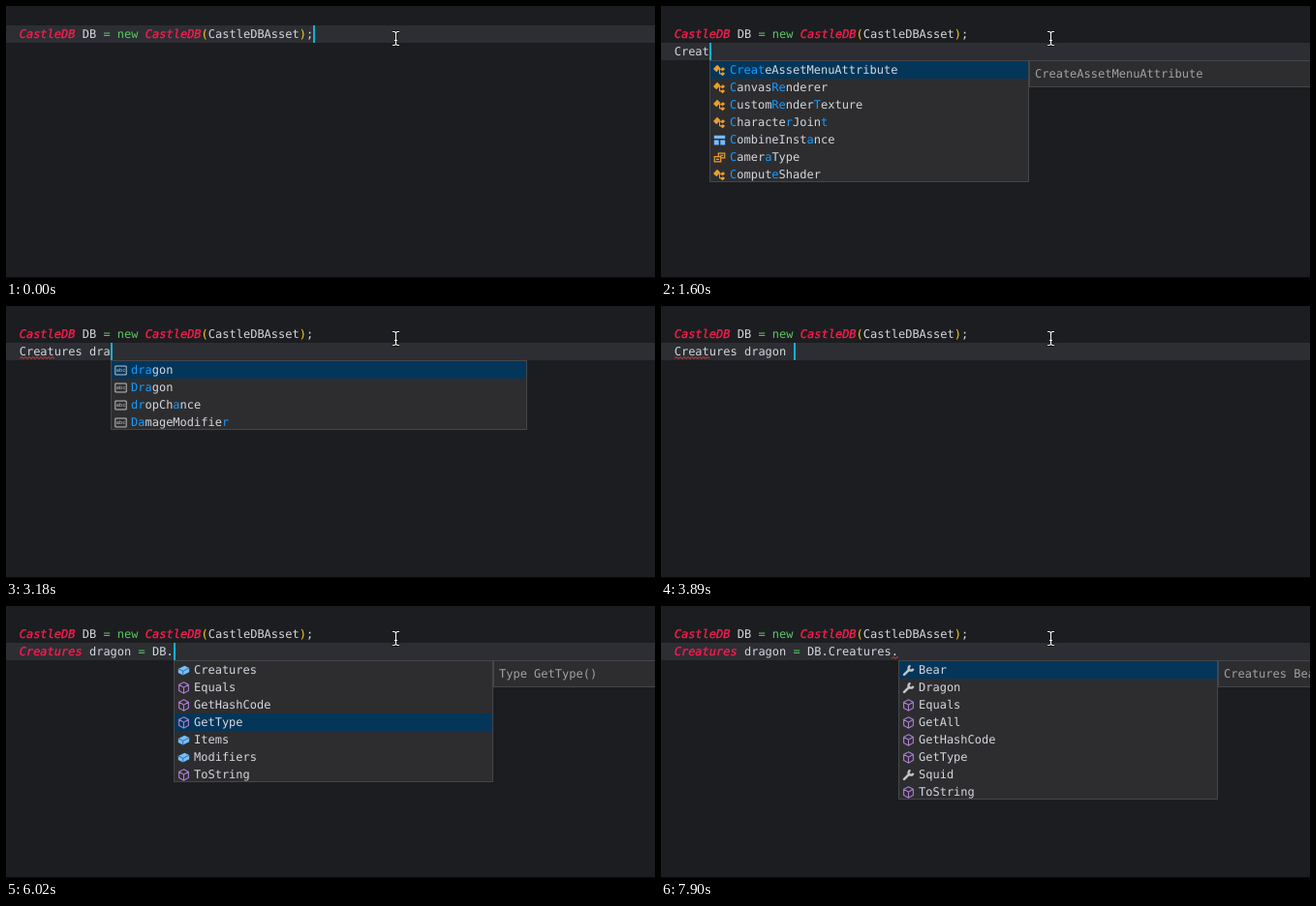
Animation, 670 px wide and 281 px high, one loop 7.99 s. Source, as an HTML page:

```html
<!DOCTYPE html>
<html lang="en">
<head>
<meta charset="utf-8">
<title>Code completion</title>
<style>
html, body { margin: 0; width: 100%; height: 100%; overflow: hidden; background: #1c1d20; }
#stage { position: relative; width: 670px; height: 281px; overflow: hidden; color: #d3d6dc;
  font: 12px/18px "DejaVu Sans Mono", monospace; text-rendering: geometricPrecision; white-space: pre; }
#stage > * { position: absolute; }
.line { left: 13.7px; height: 18px; }
#line1 { top: 20px; }
#line2 { top: 38px; }
.line i { color: #ff1c4f; -webkit-text-stroke: .3px #ff1c4f; }
.line u { color: #5bc862; text-decoration: none; }
.line s { color: #f9cf1c; text-decoration: none; }
#active { left: 0; width: 670px; height: 18px; background: #2c2e33; }
#caret { width: 2px; height: 18px; background: #14b0d0; }
#wave { top: 52px; height: 4px; overflow: hidden; }
#wave path { fill: none; stroke: #e8423f; }
#list, #info { top: 56px; box-sizing: border-box; border: 1px solid #454649; background: #2d2d30; overflow: hidden; }
.row { position: relative; height: 18px; padding-left: 20px; }
.row.on { background: #04365a; }
.row b { font-weight: 400; color: #149cff; }
.row svg { position: absolute; left: 3px; top: 2.5px; width: 13px; height: 13px; }
#bar { position: absolute; right: 0; top: 0; width: 10px; height: 27px; background: #79797966; }
#info { width: 430px; padding: 4px 5px; color: #a0a1a3; }
#info p { margin: 26px 0 0; color: #d0d1d3; font: 12px/18px Inter, sans-serif; }
#mouse { left: 396px; top: 24px; }
#edge { left: 0; top: 280px; width: 670px; height: 1px; background: #0b0b0c; }
</style>
</head>
<body>
<div id="stage">
  <div id="active"></div>
  <div id="line1" class="line"><i>CastleDB</i> DB <u>=</u> <u>new</u> <i>CastleDB</i><s>(</s>CastleDBAsset<s>)</s>;</div>
  <div id="line2" class="line"></div>
  <svg id="wave"><path/></svg>
  <div id="caret"></div>
  <div id="list"></div>
  <div id="info"></div>
  <svg id="mouse" width="13" height="18" fill="none">
    <path id="beam" d="M3 2.5h2l1.5 1 1.5-1h2M6.500 3.500v12M5 11.500h3M3 16.500h2l1.500-1 1.500 1h2" stroke="#111" stroke-width="3"/>
    <path d="M3 2.5h2l1.5 1 1.5-1h2M6.500 3.500v12M5 11.500h3M3 16.500h2l1.500-1 1.500 1h2" stroke="#f4f4f4" stroke-width="1.2"/>
  </svg>
  <div id="edge"></div>
</div>
<script>
const $ = id => document.getElementById(id);
const LOOP = 7990, CHAR = 7.2246;
const column = n => Math.round(13.7 + n * CHAR);

const icons = {
  s: '<path fill="#75beff" d="M1 2h14v4H1zM1 8h6v6H1zM9 8h6v6H9z"/>',
  c: '<path fill="#ee9d28" d="M5 1l4 4-5 5-4-4zM12 4l3 2-3 3-3-2zM12 10l3 2-3 3-3-2z"/><path fill="none" stroke="#ee9d28" stroke-width="1.3" d="M7 6.500h4M8 7v5h3"/>',
  e: '<path fill="none" stroke="#ee9d28" stroke-width="1.500" d="M6.500 6V2.500h8v6H10M1.500 7h8v6.500h-8zM3.500 10.200h4M9 5.500h3.500"/>',
  m: '<path fill="none" stroke="#b180d7" stroke-width="1.300" d="M8 1l6 3v7.500l-6 3.500-6-3.500V4zM2 4l6 3.500L14 4M8 7.500V15"/>',
  f: '<path fill="#75beff" d="M1 6l8-4 6 3v5l-8 4-6-3z"/><path fill="none" stroke="#2d5f8a" d="M1 6l6 3 8-4M7 9v5"/>',
  p: '<path fill="none" stroke="#c5c5c5" stroke-width="3" stroke-linecap="round" d="M2.500 13.500L9 7"/><path fill="none" stroke="#c5c5c5" stroke-width="2.800" d="M10.500 2.300a3 3 0 1 0 3.400 3.500"/>',
  a: '<path fill="none" stroke="#c5c5c5" stroke-width="1.200" d="M1 2.500h14v11H1z"/><text x="2.300" y="10.300" font-size="6.500" fill="#c5c5c5">abc</text>'
};

// Each entry is an icon key, a colon and a label; brackets mark matched letters.
const makeList = (items, title, more) => ({ items: items.split(' '), width: 330, sel: 0, title, ...more });
const cache = 's:[C]ache s:[C]achedAssetBundle s:[C]acheIndex c:[C]aching e:[C]alendarIdentifier e:[C]alendarUnit c:[C]amera e:[C]ameraClearFlags e:[C]ameraType m:[C]ancelInvoke c:[C]anvas c:[C]anvasGroup';
const words = { width: 430 };
const lists = {
  C0: makeList(cache, '', { bar: 1 }),
  C: makeList(cache, 'Cache', { bar: 1,
    doc: 'Data structure for cache. Please refer to See\nAlso:Caching.AddCache for more information.' }),
  Cr: makeList('c:[Cr]ashReport c:[Cr]eateAssetMenuAttribute c:[C]anvas[R]enderer c:[C]haracte[r]Controller c:[C]haracte[r]Joint s:[C]haracte[r]Info c:[C]ustomRende[r]Texture c:[C]olo[r] s:[C]olo[r]32 e:[C]olo[r]Space c:[C]olo[r]Utility e:[C]urso[r]LockMode', 'CrashReport', { bar: 1 }),
  Cre: makeList('c:[Cre]ateAssetMenuAttribute c:[C]anvas[Re]nderer c:[C]haracte[r]Controll[e]r c:[C]ustom[Re]nderTexture e:[C]ustom[Re]nderTextureUpdateMode c:[C]rashRepo[r]t s:[C]ombin[e]Instance e:[C]olo[r]Space c:[C]ubemapA[r]ray s:[C]ulling[Gr]oupEvent e:[C]urso[r]Mode c:[C]omput[e]Shader', 'CreateAssetMenuAttribute', { bar: 1 }),
  Creat: makeList('c:[Creat]eAssetMenuAttribute c:[C]anvas[Re]nderer c:[C]ustom[Re]nder[T]exture c:[C]haracte[r]Join[t] s:[C]ombineInst[a]nce e:[C]amer[a]Type c:[C]omput[e]Shader', 'CreateAssetMenuAttribute'),
  Creatu: makeList('c:[Creat]eAssetMenuAttrib[u]te c:[C]ustom[Re]nder[T]ext[u]re', 'CreateAssetMenuAttribute'),
  d: makeList('a:[d]ragon a:[D]ragon a:[d]ropChance a:[D]amageModifier a:[D]B a:[d]efense a:[d]rops a:[d]amage a:Castle[D]B a:Castle[D]BAsset a:i[d] a:Mo[d]ifiers', '', words),
  dr: makeList('a:[dr]agon a:[Dr]agon a:[dr]opChance a:[dr]ops a:[D]amageModifie[r]', '', words),
  dra: makeList('a:[dra]gon a:[Dra]gon a:[dr]opCh[a]nce a:[Da]mageModifie[r]', '', words),
  drag: makeList('a:[drag]on a:[Drag]on', '', words),
  D: makeList('f:[D]B c:[D]ebug e:[D]eviceType e:[D]epthTextureMode m:[D]estroy m:[D]estroyImmediate s:[D]etailPrototype c:[D]isplay m:[D]ontDestroyOnLoad e:[D]rivenTransformProperties c:[D]ynamicGI c:Castle[D]B', 'CastleDB DB', { bar: 1 }),
  DB: makeList('f:[DB] c:Castle[DB] f:Castle[DB]Asset c:[D]e[b]ug c:[D]e[b]ugger s:[D]ou[b]le c:[D]isposa[b]le c:[D]ata[B]ase m:[D]ou[b]leClick', 'CastleDB DB'),
  type: makeList('f:Creatures m:Equals m:GetHashCode m:GetType f:Items f:Modifiers m:ToString', 'Type GetType()', { sel: 3 }),
  kinds: makeList('f:[C]reatures', 'CreaturesType Creatures'),
  beasts: makeList('p:Bear p:Dragon m:Equals m:GetAll m:GetHashCode m:GetType p:Squid m:ToString', 'Creatures Bear')
};

const word = { wave: [0, 5] };
const decl = 'Creatures dragon = ';
const full = decl + 'DB.Creatures';
// time, second line, open list, extras
const steps = [
  [0, '', '', { first: 1 }],
  [170, ''],
  [620, 'C'],
  [710, 'C', 'C0'],
  [800, 'C', 'C'],
  [1060, 'Cr', 'C'],
  [1150, 'Cr', 'Cr'],
  [1240, 'Cre', 'Cre'],
  [1330, 'Crea', 'Cre'],
  [1600, 'Creat', 'Creat'],
  [2040, 'Creatu', 'Creatu'],
  [2300, 'Creatur', '', word],
  [2390, 'Creatures', '', word],
  [2480, 'Creatures ', '', word],
  [2740, 'Creatures d', '', word],
  [2830, 'Creatures d', 'd', word],
  [2920, 'Creatures dr', 'd', word],
  [3010, 'Creatures dr', 'dr', word],
  [3100, 'Creatures dra', 'dr', word],
  [3180, 'Creatures dra', 'dra', word],
  [3270, 'Creatures drag', 'drag', word],
  [3360, 'Creatures drago', 'drag', word],
  [3450, 'Creatures dragon', 'drag', word],
  [3800, 'Creatures dragon ', 'drag', { ...word, at: 16 }],
  [3890, 'Creatures dragon ', '', word],
  [4250, 'Creatures dragon ', '', { ...word, off: 1 }],
  [4520, 'Creatures dragon =', '', word],
  [4600, decl, '', word],
  [5140, decl, '', { ...word, off: 1 }],
  [5410, decl, '', { off: 1 }],
  [5490, decl + 'D'],
  [5580, decl + 'D', 'D'],
  [5670, decl + 'DB', 'D'],
  [5760, decl + 'DB', 'DB'],
  [5930, decl + 'DB.'],
  [6020, decl + 'DB.', 'type'],
  [6380, decl + 'DB.C', 'kinds'],
  [6830, full, 'kinds', { at: 23 }],
  [6920, full],
  [7190, full + '.', 'beasts'],
  [7630, full + '.', 'beasts', { off: 1 }],
  [7900, full + '.', 'beasts', { off: 1, wave: [31, 1] }]
];

const paint = text => text.includes('=')
  ? text.replace('=', '<u>=</u>').replace('Creatures', '<i>Creatures</i>')
  : text;

const row = (item, on) => {
  const label = item.slice(2).replace(/\[(.*?)\]/g, '<b>$1</b>');
  return `<div class="row${on ? ' on' : ''}"><svg viewBox="0 0 16 16">${icons[item[0]]}</svg>${label}</div>`;
};

function showList(key, x) {
  const list = lists[key], box = $('list'), info = $('info');
  box.hidden = !list;
  info.hidden = !list || !list.title;
  if (!list) return;
  box.style.left = x + 'px';
  box.style.width = list.width + 'px';
  box.style.height = list.items.length * 18 + 'px';
  box.innerHTML = list.items.map((item, i) => row(item, i === list.sel)).join('') +
    (list.bar ? '<div id="bar"></div>' : '');
  info.style.left = x + list.width + 'px';
  info.style.height = (list.doc ? 90 : 28) + 'px';
  info.innerHTML = list.title + (list.doc ? `<p>${list.doc}</p>` : '');
}

function showWave(wave) {
  $('wave').style.display = wave ? '' : 'none';
  if (!wave) return;
  const [from, count] = wave, width = count * CHAR;
  $('wave').style.left = column(from) + 'px';
  $('wave').style.width = width + 'px';
  $('wave').firstChild.setAttribute('d', 'M0 2.5' + 'l2-2 2 2'.repeat(Math.ceil(width / 4)));
}

function show([, text, key, extra = {}]) {
  const { first, off, at = text.length, wave } = extra;
  const top = first ? '20px' : '38px';
  $('active').style.top = $('caret').style.top = top;
  $('caret').style.left = column(first ? 42 : text.length) + 'px';
  $('caret').hidden = !!off;
  $('line2').innerHTML = paint(text);
  showWave(wave);
  showList(key, column(at));
}

const start = performance.now();
let shown;
function tick() {
  const t = (performance.now() - start) % LOOP;
  const step = steps.findLast(s => s[0] <= t);
  if (step !== shown) show(shown = step);
  requestAnimationFrame(tick);
}
tick();
</script>
</body>
</html>
```
